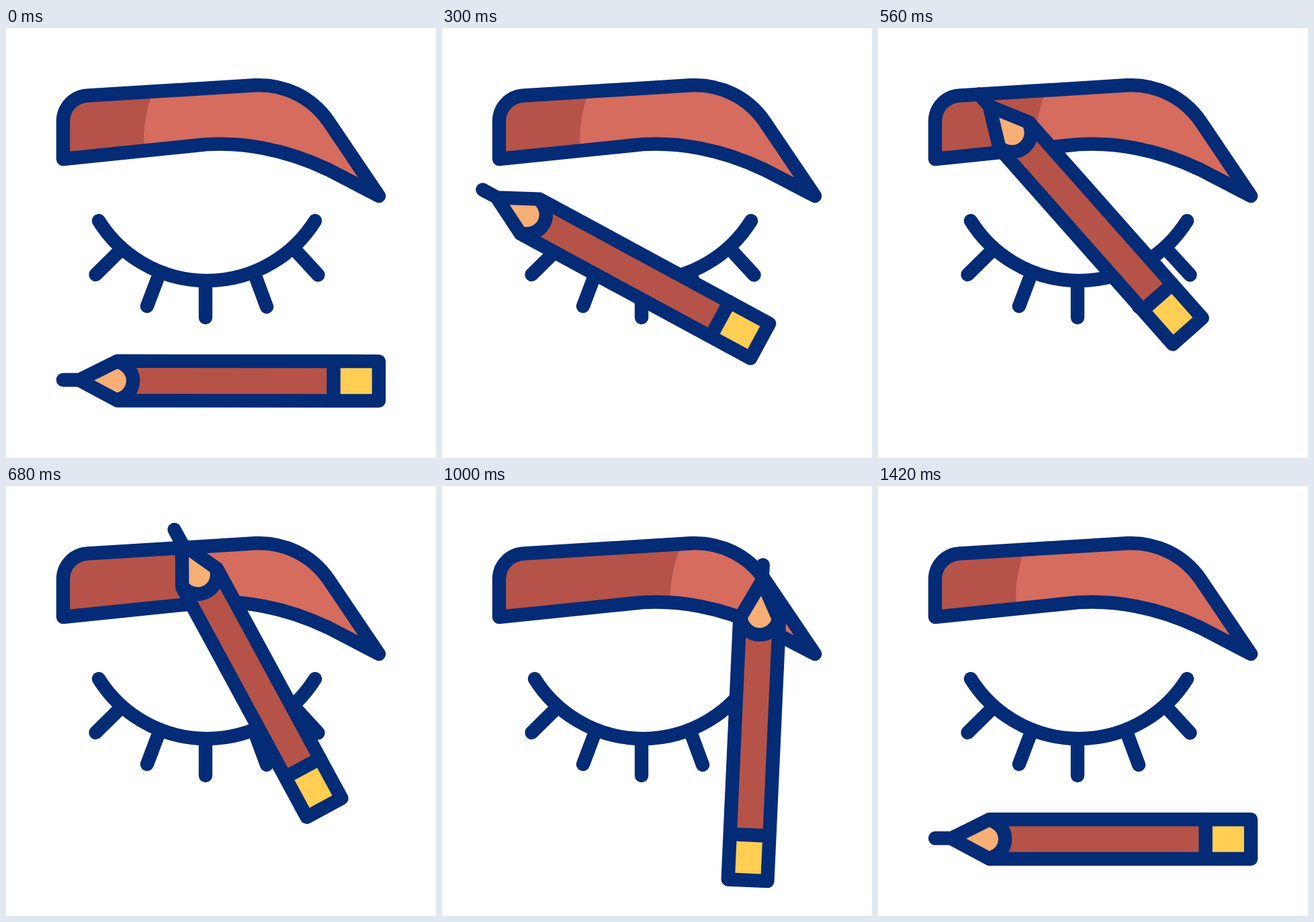
An HTML page that plays this animation: 640 by 640 pixels, repeating every 2400 ms.

```html
<!DOCTYPE html>
<html lang="en">
<head>
<meta charset="utf-8">
<title>Eyebrow pencil</title>
<style>
  html, body { margin: 0; width: 100%; height: 100%; overflow: hidden; background: #fff; }
  svg { display: block; width: 100vw; height: 100vh; }
  .line { fill: none; stroke: #042b76; stroke-width: 20.4; stroke-linecap: round; stroke-linejoin: round; }
  .dark { fill: #b55348; }
  .light { fill: #d66c5e; }
  .wood { fill: #f7af75; }
  .cap { fill: #ffce52; }
</style>
</head>
<body>
<svg viewBox="0 0 640 640">
  <defs>
    <path id="brow" d="M85 195V139C85 118 101 101.500 122 100.500L370 85.300C414 83 455 103 480 139L555 250L480 211C420 182 350 166.500 280 175Z"/>
    <clipPath id="inBrow"><use href="#brow"/></clipPath>
  </defs>

  <use href="#brow" class="light"/>
  <g clip-path="url(#inBrow)">
    <path id="shade" class="dark" d="M-100 80H226L219 95Q202 135 206 185V220H-100Z"/>
  </g>
  <use href="#brow" class="line"/>

  <path class="line" d="M138 287A190 190 0 0 0 460 287
    M172 329L133.500 367M227 369L210 414M297 376V431M371 369L388 415M430 330L464.500 367.500"/>

  <g id="pencil">
    <path class="dark" d="M166 496H555V555H166Z"/>
    <path class="cap" d="M488 496H555V555H488Z"/>
    <path class="wood" d="M109 524.500L166 496.500A28.500 28.500 0 0 1 166 554.500Z"/>
    <path class="line" d="M85 524.200H109M166 496.200H555V555H166L109 524.500ZM166 497.500A28.500 28.500 0 0 1 166 553.500M487.600 496V555"/>
  </g>
</svg>
<script>
  const LOOP = 2400, SWEEP = 135;
  const REST = [320, 524.75, 0], LIFT = [263.25, 288.75, 38.5], END = [466.75, 351.75, 92.8];

  // Strokes of the pencil: time, then centre x, centre y, angle
  const strokes = [
    [[0, ...REST], [180, 289.25, 432, 15.3], [250, 275, 386, 23], [420, ...LIFT]],
    [[420, ...LIFT], [540, 297, 277, 46.5], [680, 361.75, 271.75, 61.4], [780, 410, 288, 73], [1000, ...END]],
    [[1000, ...END], [1080, 440.3, 382.9, 73.5], [1200, 390, 441.75, 40.2], [1420, ...REST]]
  ];

  // Smooth curve through all points of one stroke
  const curve = (keys, t, col) => keys.reduce((sum, a) =>
    sum + keys.reduce((w, b) => b === a ? w : w * (t - b[0]) / (a[0] - b[0]), a[col]), 0);

  function pose(t) {
    const keys = strokes.find(s => t < s[s.length - 1][0]);
    return keys ? [1, 2, 3].map(col => curve(keys, t, col)) : REST;
  }

  function shift(t, x) {
    if (t >= 1000) return SWEEP * (x - REST[0]) / (END[0] - REST[0]);
    const k = Math.max(0, (t - 365) / 635);
    return SWEEP * k * k * (3 - 2 * k);
  }

  const pencil = document.getElementById('pencil');
  const shade = document.getElementById('shade');
  const start = performance.now();

  function draw() {
    const t = (performance.now() - start) % LOOP;
    const [x, y, angle] = pose(t);
    pencil.setAttribute('transform',
      `translate(${x} ${y}) rotate(${angle}) translate(${-REST[0]} ${-REST[1]})`);
    shade.setAttribute('transform', `translate(${shift(t, x)} 0)`);
    requestAnimationFrame(draw);
  }
  draw();
</script>
</body>
</html>
```
